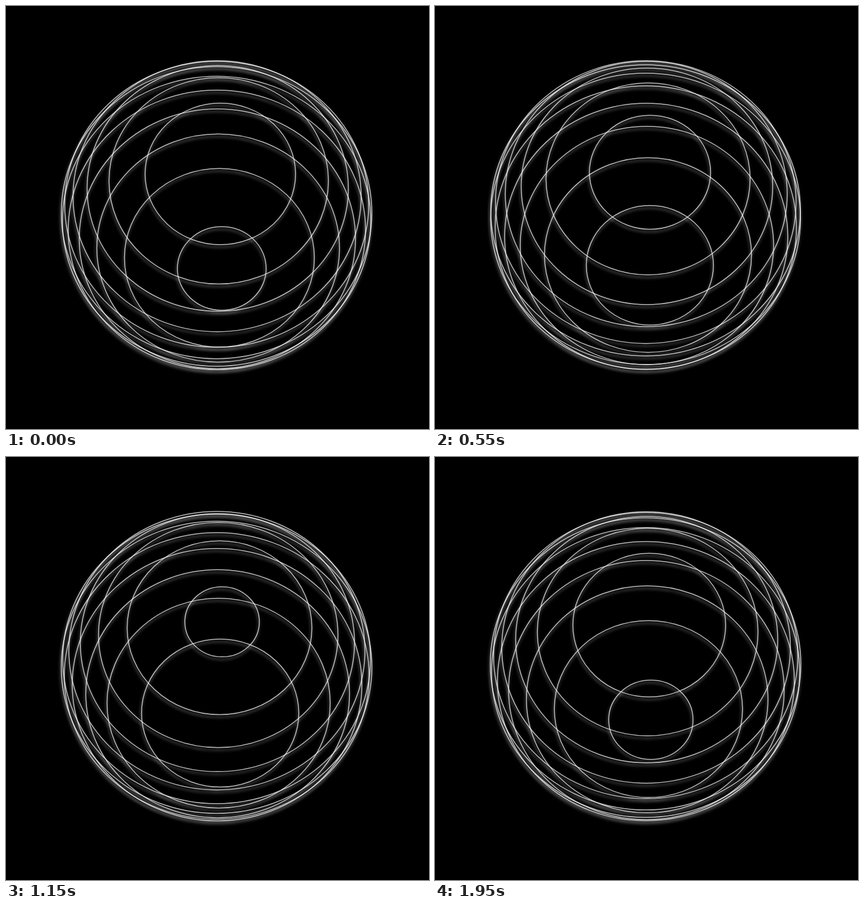
Animation, 748 px wide and 748 px high, one loop 2000 ms. Source, as an HTML page with a canvas:

```html
<!DOCTYPE html>
<html lang="en">
<head>
<meta charset="utf-8">
<title>Ring sphere</title>
<style>
  html, body { margin: 0; width: 100%; height: 100%; overflow: hidden; background: #000; }
  canvas { display: block; }
</style>
</head>
<body>
<canvas id="stage" width="748" height="748"></canvas>
<script>
const ctx = document.getElementById('stage').getContext('2d');
const LOOP = 2000, STEP = 50;
const RINGS = 12, RADIUS = 274.8, GAP = 2 * RADIUS / RINGS;
const TILT = 0.9404, RISE = 0.327;
const DRIFT_X = 0.0468, DRIFT_Y = 0.0451;
const start = performance.now();

// A slice of the sphere at height h, seen from above at a tilt.
function drawRing(h) {
  const r = Math.sqrt(Math.max(0, RADIUS * RADIUS - h * h));
  const x = 385.2 - DRIFT_X * r;
  const y = 381.6 - DRIFT_Y * r - RISE * h;
  ctx.beginPath();
  ctx.ellipse(x, y, r, r * TILT, 0, 0, 2 * Math.PI);
  ctx.stroke();
}

function draw() {
  const elapsed = performance.now() - start;
  const t = Math.floor(elapsed / STEP) * STEP % LOOP;
  const phase = (t / LOOP + 0.25) % 1;

  ctx.shadowColor = 'transparent';
  ctx.fillStyle = '#000';
  ctx.fillRect(0, 0, 748, 748);

  ctx.strokeStyle = 'rgba(255, 255, 255, 0.75)';
  ctx.lineWidth = 1.5;
  ctx.shadowColor = 'rgba(255, 255, 255, 0.7)';
  ctx.shadowBlur = 5;
  ctx.shadowOffsetX = -1;
  ctx.shadowOffsetY = 4.5;
  for (let i = 0; i < RINGS; i++) drawRing(GAP * (i + phase) - RADIUS);

  requestAnimationFrame(draw);
}
draw();
</script>
</body>
</html>
```
